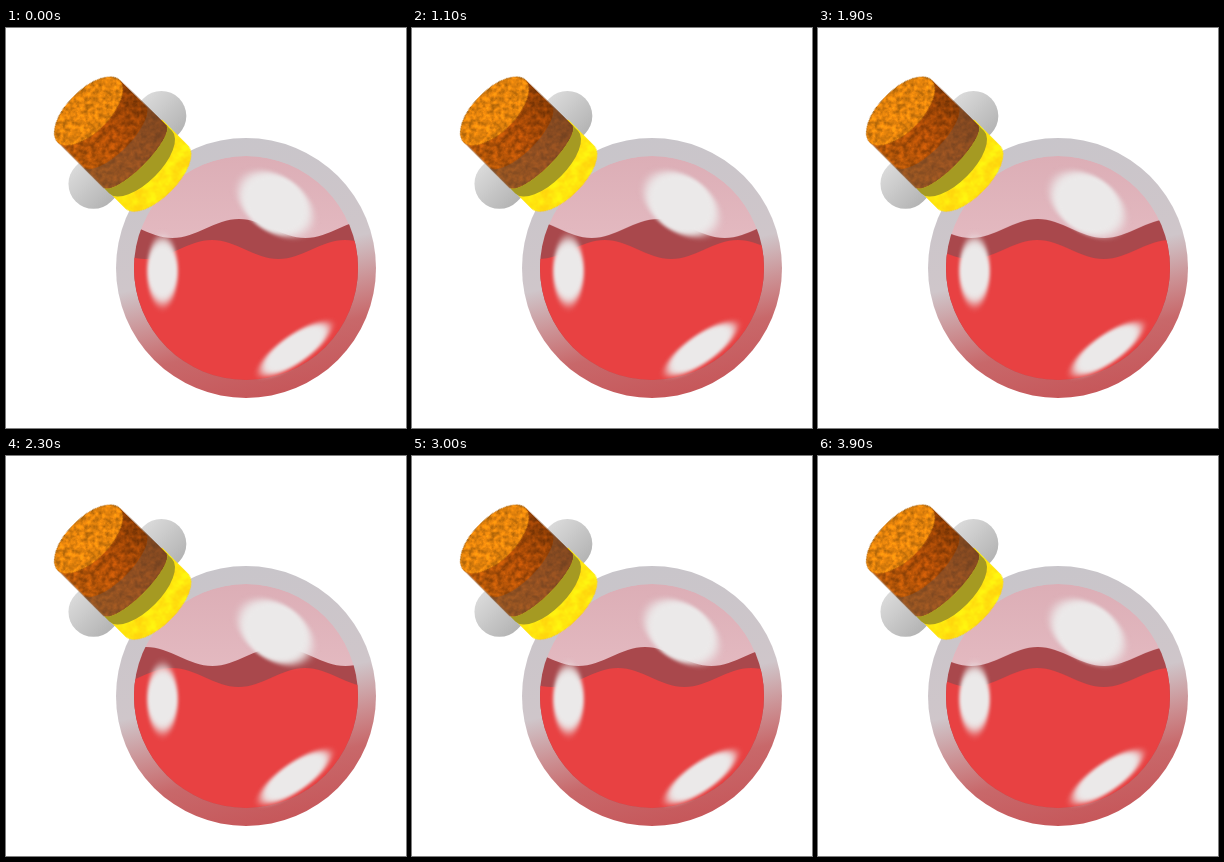
Write an HTML page that moves like this. It is 400x400 px and loops after 4000 ms.

```html
<!DOCTYPE html>
<html lang="en">
<head>
<meta charset="utf-8">
<title>Potion</title>
<style>
  html, body { margin: 0; width: 100%; height: 100%; overflow: hidden; background: #fff; }
  svg { display: block; width: 400px; height: 400px; }
  .back { fill: #a9484c; animation: drift 1s steps(10) infinite; --shift: 133px; }
  .front { fill: #e84142; animation: drift 1s steps(10) infinite; --shift: -133px; }
  .glint { opacity: 0; animation: glint 2s step-end infinite; }
  @keyframes drift { to { transform: translateX(var(--shift)); } }
  @keyframes glint { 0% { opacity: 0; } 25% { opacity: 1; } 30%, 100% { opacity: 0; } }
</style>
</head>
<body>
<svg viewBox="0 0 400 400">
  <defs>
    <linearGradient id="glass" x1=".38" y1="0" x2=".62" y2="1">
      <stop offset="0" stop-color="#c8c5ca"/>
      <stop offset=".48" stop-color="#cfc6ca"/>
      <stop offset=".64" stop-color="#cc9295"/>
      <stop offset=".78" stop-color="#c8686a"/>
      <stop offset="1" stop-color="#c65659"/>
    </linearGradient>
    <linearGradient id="air" x1="0" y1="0" x2="0" y2="1">
      <stop offset="0" stop-color="#dcaeb6"/>
      <stop offset=".4" stop-color="#e4bac1"/>
    </linearGradient>
    <linearGradient id="bark">
      <stop offset="0" stop-color="#b35608"/>
      <stop offset=".5" stop-color="#b04e07"/>
      <stop offset="1" stop-color="#8a3c05"/>
    </linearGradient>
    <linearGradient id="lip" x1="0" y1="0" x2="0" y2="1">
      <stop offset="0" stop-color="#dadada"/>
      <stop offset="1" stop-color="#b4b4b4"/>
    </linearGradient>
    <filter id="rough" x="-10%" y="-10%" width="120%" height="120%" color-interpolation-filters="sRGB">
      <feTurbulence type="fractalNoise" baseFrequency=".2" numOctaves="4" seed="7"/>
      <feColorMatrix values="2 0 0 0 -.5  2 0 0 0 -.5  2 0 0 0 -.5  0 0 0 0 1"/>
      <feComposite in2="SourceGraphic" operator="arithmetic" k1=".44" k3=".78"/>
    </filter>
    <filter id="grain" x="-10%" y="-10%" width="120%" height="120%" color-interpolation-filters="sRGB">
      <feTurbulence type="fractalNoise" baseFrequency=".1" numOctaves="3" seed="3"/>
      <feColorMatrix values="0 0 0 0 1  2 0 0 0 -.5  2 0 0 0 -.5  0 0 0 0 1"/>
      <feComposite in2="SourceGraphic" operator="arithmetic" k1=".14" k3=".93"/>
    </filter>
    <filter id="fade" x="-30%" y="-30%" width="160%" height="160%">
      <feGaussianBlur stdDeviation="5 1.5"/>
    </filter>
    <clipPath id="bowl"><circle cx="240" cy="240" r="112"/></clipPath>
    <path id="wave" d="M0 0c24.2 0 42.3 19 66.5 19s42.3-19 66.5-19s42.3 19 66.5 19s42.3-19 66.5-19s42.3 19 66.5 19s42.3-19 66.5-19s42.3 19 66.5 19s42.3-19 66.5-19V200H0z"/>
  </defs>

  <circle cx="240" cy="240" r="130" fill="url(#glass)"/>
  <g clip-path="url(#bowl)">
    <circle cx="240" cy="240" r="112" fill="url(#air)"/>
    <g class="back"><use href="#wave" x="-33" y="191"/></g>
    <g class="front"><use href="#wave" x="73" y="212"/></g>
  </g>

  <!-- highlights, blurred along their length -->
  <g fill="#ebe9e9">
    <ellipse rx="40" ry="28" transform="translate(269.500 176) rotate(35)" filter="url(#fade)"/>
    <ellipse rx="33" ry="15.500" transform="translate(156.500 243) rotate(90)" filter="url(#fade)"/>
    <ellipse rx="41" ry="14" transform="translate(289 321) rotate(-35)" filter="url(#fade)"/>
  </g>

  <!-- stopper, drawn upright and tilted -->
  <g transform="translate(82.500 83) rotate(-45)">
    <rect x="-73" y="30" width="146" height="50" rx="25" fill="url(#lip)"/>
    <path d="M-43 58V95A44.500 20 0 0 0 46 95V58z" fill="#ffe60e" filter="url(#grain)"/>
    <path d="M-43.500 0V65A44 12 0 0 0 45 65L44 0z" fill="url(#bark)" filter="url(#rough)"/>
    <path d="M-43.500 36A44 16 0 0 0 44.500 36L45 65A44 12 0 0 1-43.500 65z" fill="#76523c" opacity=".5"/>
    <path d="M-43.500 65A44 12 0 0 0 45 65V73A44 20 0 0 1-43.500 73z" fill="#a59a22"/>
    <ellipse rx="44" ry="21" fill="#e2820c" filter="url(#rough)"/>
    <g class="glint">
      <path d="M-43 65A44 12 0 0 0-10 76.300V92A44 20 0 0 1-43 73z" fill="#d2c52c" opacity=".6"/>
      <path d="M-27 88.500L-18 91.300V113.200L-27 110.600z" fill="#fff9a0"/>
    </g>
  </g>
</svg>
</body>
</html>
```
